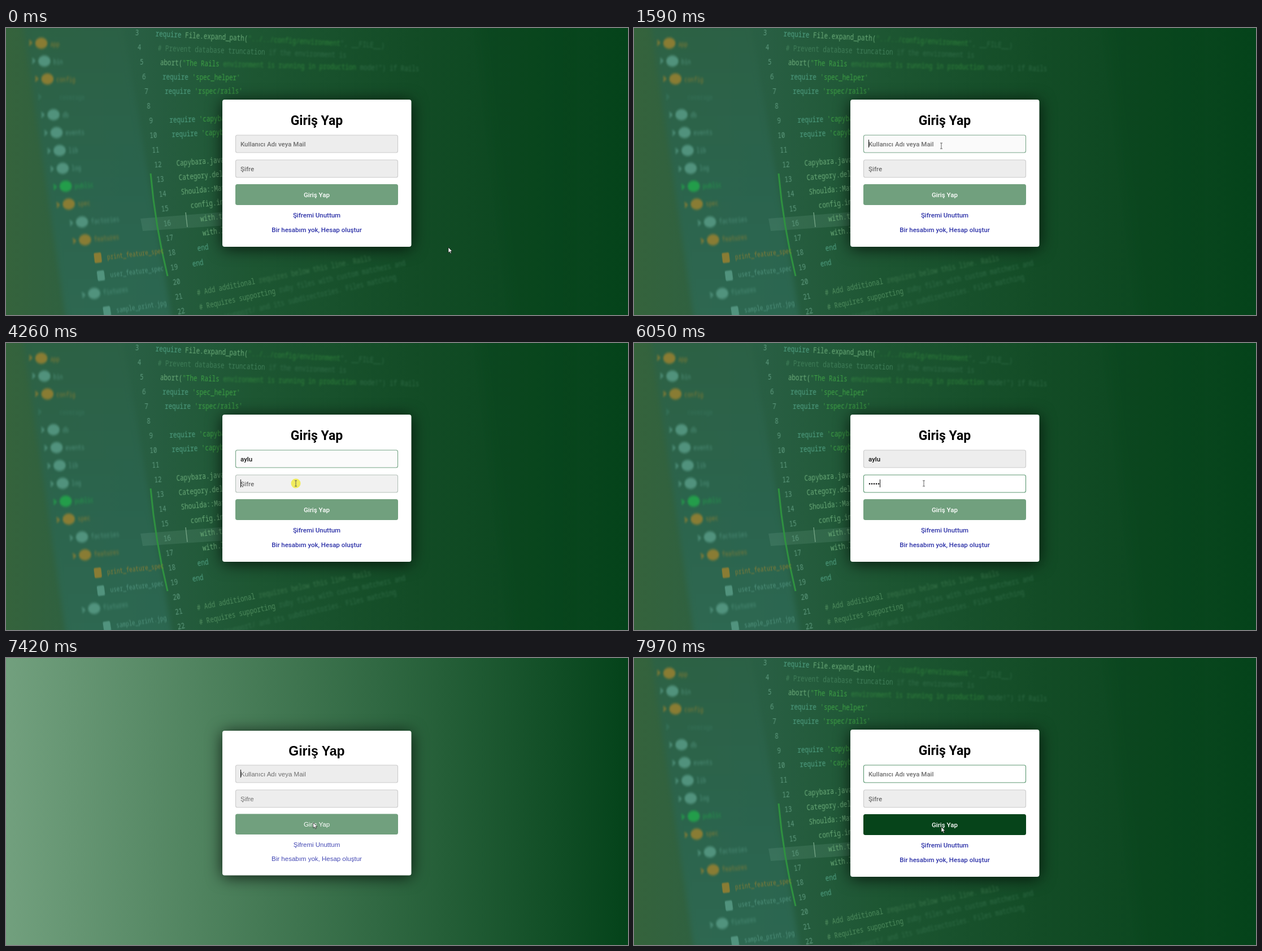
Recreate the animation shown at these times as an HTML page. Size 1101 by 509 pixels, loop 8 s.

```html
<!DOCTYPE html>
<html lang="tr">
<head>
<meta charset="utf-8">
<title>Giriş Yap</title>
<style>
  html, body { margin: 0; width: 100%; height: 100%; overflow: hidden; background: #04431a; }
  svg { display: block; width: 100vw; height: 100vh; }
  text { white-space: pre; }
  #card { font: 500 11.5px Roboto, sans-serif; }
  #card.plain { font: 400 11.5px "Liberation Sans", sans-serif; }
  #title { font-size: 23px; font-weight: 700; }
  .mid { text-anchor: middle; }
  .link { fill: #2d32a8; }
  .plain .link { fill: #4449b4; }
  #panel { filter: drop-shadow(0 3px 14px rgba(0, 0, 0, .75)); }
  #photo text { font: 14px "Noto Sans Mono", "DejaVu Sans Mono", monospace; }
  #press { mix-blend-mode: multiply; }
</style>
</head>
<body>
<svg viewBox="0 0 1101 509" preserveAspectRatio="none">
  <defs>
    <linearGradient id="page">
      <stop stop-color="#72a07e"/><stop offset="1" stop-color="#04431a"/>
    </linearGradient>
    <linearGradient id="tone">
      <stop stop-color="#35633c"/><stop offset=".2" stop-color="#295f44"/>
      <stop offset=".4" stop-color="#1d5632"/><stop offset=".65" stop-color="#134c26"/>
      <stop offset=".85" stop-color="#0b471f"/><stop offset="1" stop-color="#04431a"/>
    </linearGradient>
    <linearGradient id="tree" x2="0" y2="1">
      <stop stop-color="#2c6145"/><stop offset=".55" stop-color="#2b6550"/><stop offset="1" stop-color="#2e6a55"/>
    </linearGradient>
  </defs>
  <rect width="1101" height="509" fill="url(#page)"/>
  <g id="photo">
    <rect width="1101" height="509" fill="url(#tone)"/>
    <path d="M28-20H205L296 530H108Z" fill="url(#tree)" opacity=".8" style="filter:blur(5px)"/>
    <path d="M835-20H1000V530H900Z" fill="#04431a" opacity=".2" style="filter:blur(6px)"/>
    <path d="M238 338L390 326V350L242 360Z" fill="#8fc0a8" opacity=".14"/>
    <path d="M256 258Q264 350 286 440" fill="none" stroke="#2f9140" stroke-width="3" style="filter:blur(.7px)"/>
    <path d="M318 327L321 353" stroke="#6f9f80" stroke-width="1.5"/>
  </g>
  <g id="card">
    <rect id="panel" x="383" width="334.5" rx="4" fill="#fff"/>
    <text id="title" class="mid" x="550">Giriş Yap</text>
    <g stroke-width="1.1">
      <rect id="box1" x="406.5" y="190" width="287" height="31" rx="3"/>
      <rect id="box2" x="406.5" y="234" width="287" height="31" rx="3"/>
    </g>
    <text id="user" x="415" y="209.7"></text>
    <text id="pass" x="415" y="253.5"></text>
    <rect id="caret" width="1" height="14" fill="#111"/>
    <g id="button">
      <rect id="face" x="406" width="288" rx="3.5"/>
      <text id="label" class="mid" x="550" fill="#fff">Giriş Yap</text>
    </g>
    <text id="link1" class="mid link" x="550">Şifremi Unuttum</text>
    <text id="link2" class="mid link" x="550">Bir hesabım yok, Hesap oluştur</text>
  </g>
  <circle id="press" r="8.5" fill="#fffa62"/>
  <path id="arrow" d="M0 0V9.6L2.2 7.6L3.8 11L5.3 10.3L3.8 7H6.8Z" fill="#fff" stroke="#111" stroke-width=".7"/>
  <path id="beam" d="M-2-5H2M0-5V5M-2 5H2" stroke="#555" stroke-width=".9"/>
</svg>
<script>
const $ = id => document.getElementById(id);
const set = (node, attrs) => { for (const k in attrs) node.setAttribute(k, attrs[k]); };
const show = (node, on) => { node.style.display = on ? '' : 'none'; };

function add(parent, tag, attrs, content = '') {
  const node = document.createElementNS('http://www.w3.org/2000/svg', tag);
  set(node, attrs);
  node.textContent = content;
  return parent.appendChild(node);
}

// Blurred code editor behind the card
const INK = { key: '#4f9f82', call: '#69a977', str: '#3da044', note: '#3f7d58', dim: '#4d8a5c' };
const CODE = {
  3: [['key', 'require '], ['call', 'File.expand_path('], ['str', '"../../config/environment', 1], ['note', '", __FILE__)', 1]],
  4: [['note', '# Prevent database truncation '], ['note', 'if the environment is', 1]],
  5: [['call', 'abort('], ['str', '"The Rails '], ['str', 'environment is running in production', 1], ['note', ' mode!") if Rails', 1]],
  6: [['key', 'require '], ['str', "'spec_helper'"]],
  7: [['key', 'require '], ['str', "'rspec/rails'"]],
  9: [['key', 'require '], ['str', "'capybara"]],
  10: [['key', 'require '], ['str', "'capybara"]],
  12: [['call', 'Capybara.javas']],
  13: [['call', 'Category.delet']],
  14: [['call', 'Shoulda::Match']],
  15: [['call', '  config.inte']],
  16: [['call', '    with.te']],
  17: [['call', '    with.li']],
  18: [['key', '  end']],
  19: [['key', 'end']],
  21: [['dim', '# Add additional '], ['dim', 'requires below this line. Rails', 1]],
  22: [['dim', '# Requires supporting '], ['note', 'ruby files with custom matchers and', 1]],
  23: [['note', '# spec/support/ and its subdirectories. Files matching', 1]],
};
const ADVANCE = 8.4;
for (let n = 3; n < 24; n++) {
  const x = 232 + 4.1 * (n - 3), y = 8 + 26 * (n - 3), angle = 3 - .8 * (n - 3);
  const row = add($('photo'), 'g', { transform: `translate(${x} ${y}) rotate(${angle}) scale(.78 1)` });
  add(row, 'text', { class: 'mid', y: 5, fill: '#5c987c', style: 'filter:blur(.6px)' }, n);
  let column = 0;
  for (const [ink, words, far] of CODE[n] || []) {
    add(row, 'text', {
      x: 42 + column * ADVANCE, y: 5, fill: INK[ink], opacity: far ? .6 : 1,
      style: `filter:blur(${far ? 1.8 : .4}px)`,
    }, words);
    column += words.length;
  }
}

// File tree: colour, depth, name
const OCHRE = '#9a8130', TEAL = '#589b86', LIME = '#22a84a', FAINT = '#39775f';
[
  [OCHRE, 0, 'app'], [TEAL, 0, 'bin'], [OCHRE, 0, 'config'], [FAINT, 0, 'coverage'],
  [TEAL, 0, 'db'], [TEAL, 0, 'events'], [TEAL, 0, 'lib'], [TEAL, 0, 'log'],
  [LIME, 0, 'public'], [OCHRE, 0, 'spec'], [TEAL, 1, 'factories'], [OCHRE, 1, 'features'],
  [OCHRE, 2, 'print_feature_spec'], [TEAL, 2, 'user_feature_spec'], [TEAL, 1, 'fixtures'], [TEAL, 2, 'sample_print.jpg'],
].forEach(([fill, depth, name], i) => {
  const x = 62.5 + 5.4 * i + 18 * depth, y = 27 + 31.7 * i;
  const blur = depth == 2 ? 1.1 : 2.2;
  const row = add($('photo'), 'g', {
    fill, opacity: .85, style: `filter:blur(${blur}px)`,
    transform: `translate(${x} ${y}) rotate(${2 - .7 * i}) scale(.72 1)`,
  });
  if (depth == 2) add(row, 'rect', { x: -10, y: -9, width: 18, height: 18, rx: 3 });
  else {
    if (fill != FAINT) add(row, 'ellipse', { rx: 15, ry: 10 });
    add(row, 'path', { d: 'M-30-4L-24 0L-30 4', fill: 'none', stroke: fill, 'stroke-width': 3 });
  }
  add(row, 'text', { x: 22, y: 5, style: 'font-size:13px' }, name);
});

// Timeline
const LOOP = 8000, FOCUS_USER = 1460, FOCUS_PASS = 4220, MOUSE_DOWN = 7180, RELOAD = 7420, STYLED = 7490, NUDGE = 7970;
const NAME = 'aylu';
const NAME_KEYS = [2530, 2660, 2920, 3260], PASS_KEYS = [5120, 5320, 5590, 5850, 6050];
const CARET_USER = [[FOCUS_USER, 2000], [2530, 3790], [RELOAD, NUDGE]];
const CARET_PASS = [[FOCUS_PASS, 4790], [5120, 6550], [7050, MOUSE_DOWN]];
const PRESSES = [[FOCUS_USER, 1560], [FOCUS_PASS, 4330], [7200, 7400]];
const MOVES = [
  [70, 1290, 783, 389, 544, 209], [3790, 4190, 544, 209, 513, 249],
  [6450, 7200, 513, 249, 544, 292], [NUDGE - 1, NUDGE, 544, 292, 544, 299.5],
];

const clamp = v => Math.min(1, Math.max(0, v));
const within = (spans, t) => spans.some(([from, to]) => t >= from && t < to);
const typed = (keys, t) => t < RELOAD ? keys.filter(k => t >= k).length : 0;
const fade = (t, start) => (1 - (1 - clamp((t - start) / 300)) ** 3) ** 1.5;
const blend = (a, b, p) => `rgb(${a.map((v, i) => Math.round(v + (b[i] - v) * p))})`;

function pointer(t) {
  const [from, to, x0, y0, x1, y1] = MOVES.findLast(m => t >= m[0]) || MOVES[0];
  const p = clamp((t - from) / (to - from)), s = p * p * (3 - 2 * p);
  return [x0 + (x1 - x0) * s, y0 + (y1 - y0) * s];
}

function paintBox(box, focus) {
  set(box, {
    fill: blend([237, 237, 237], [255, 255, 255], focus),
    stroke: blend([204, 204, 204], [92, 152, 114], focus),
  });
}

function paintField(node, value, hint) {
  node.textContent = value || hint;
  set(node, { fill: value ? '#111' : '#6e6e6e' });
  return 415 + (value ? node.getComputedTextLength() : 0);
}

function draw(t) {
  const plain = t >= RELOAD && t < STYLED;
  const at = (styled, bare) => plain ? bare : styled;
  show($('photo'), !plain);
  $('card').setAttribute('class', at('', 'plain'));
  set($('panel'), { y: at(127, 129), height: at(261, 256.5) });
  set($('title'), { y: at(172, 173) });
  set($('face'), { y: at(277, 276.5), height: at(37, 36.5) });
  set($('label'), { y: at(299.6, 298.5) });
  set($('link1'), { y: at(336.3, 335) });
  set($('link2'), { y: at(361.8, 359.7) });

  paintBox($('box1'), fade(t, FOCUS_USER) - fade(t, FOCUS_PASS) + fade(t, RELOAD));
  paintBox($('box2'), t < RELOAD ? fade(t, FOCUS_PASS) - fade(t, MOUSE_DOWN) : 0);
  const userEnd = paintField($('user'), NAME.slice(0, typed(NAME_KEYS, t)), 'Kullanıcı Adı veya Mail');
  const passEnd = paintField($('pass'), '•'.repeat(typed(PASS_KEYS, t)), 'Şifre');
  const inPass = within(CARET_PASS, t);
  show($('caret'), inPass || within(CARET_USER, t));
  set($('caret'), { x: Math.round(inPass ? passEnd : userEnd), y: inPass ? 242 : 198 });

  const [x, y] = pointer(t);
  const over = (top, bottom) => x > 406 && x < 694 && y > top && y < bottom;
  const stale = t >= RELOAD && t < NUDGE;
  const pressed = within(PRESSES, t);
  const onButton = over(277, 314) && !stale;
  set($('face'), { fill: onButton ? '#06441a' : '#71a07e' });
  set($('button'), { transform: onButton && pressed ? 'translate(550 295.5) scale(.98) translate(-550 -295.5)' : '' });

  const onField = over(189, 222) || over(233, 266);
  show($('beam'), onField);
  show($('arrow'), !onField);
  show($('press'), pressed);
  for (const id of ['beam', 'arrow', 'press']) set($(id), { transform: `translate(${x} ${y})` });
}

const begin = performance.now();
function tick() {
  draw((performance.now() - begin) % LOOP);
  requestAnimationFrame(tick);
}
tick();
</script>
</body>
</html>
```
